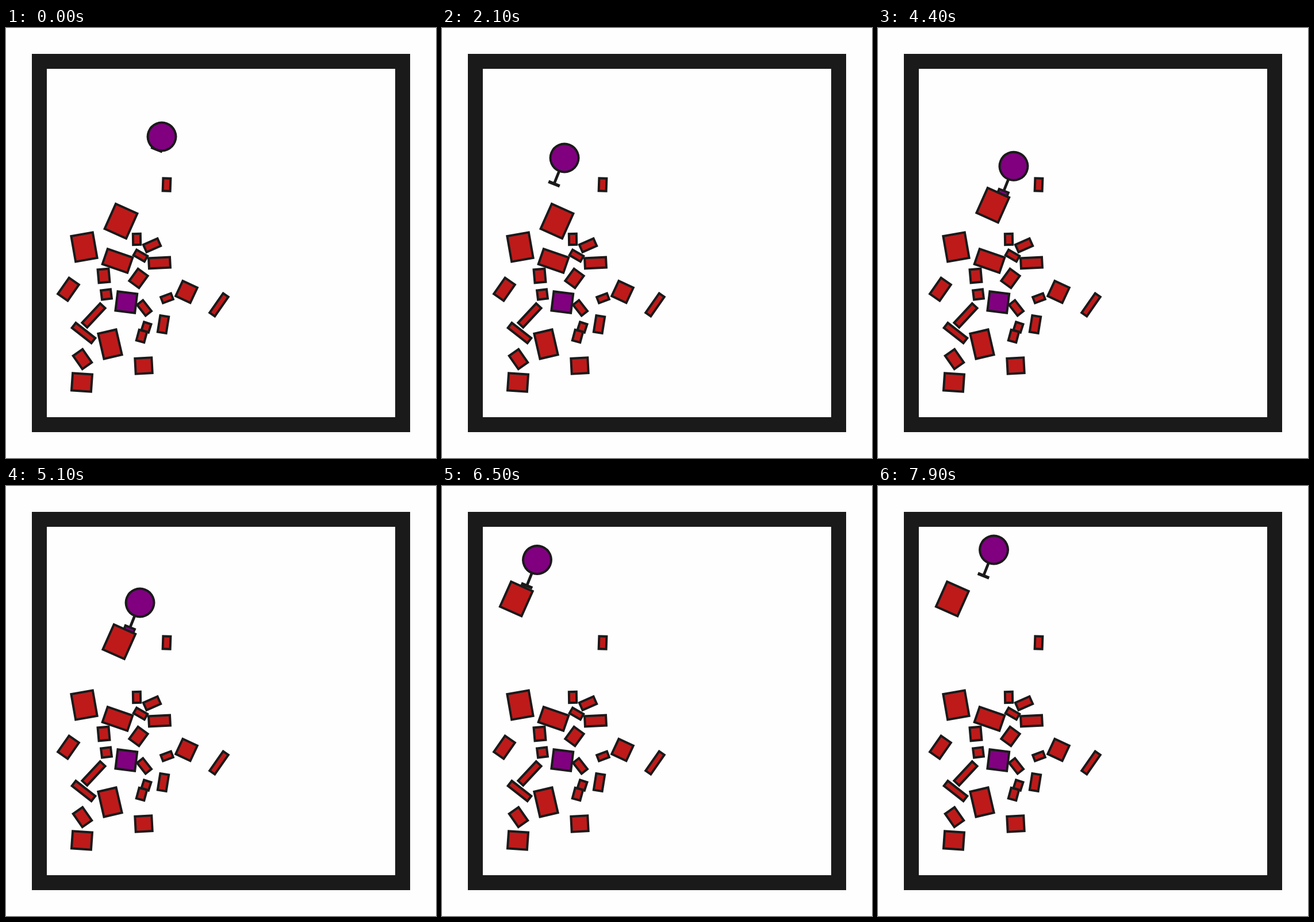
Write an HTML page with a canvas that moves like this. It is 748 by 748 pixels and loops after 8000 ms.

```html
<!DOCTYPE html>
<html lang="en">
<head>
<meta charset="utf-8">
<title>Robot moving blocks</title>
<style>
html, body { margin: 0; width: 100%; height: 100%; overflow: hidden; background: #fefefe; }
canvas { display: block; }
</style>
</head>
<body>
<canvas id="stage" width="748" height="748"></canvas>
<script>
const ctx = document.getElementById('stage').getContext('2d');
const INK = '#1a1a1a', RED = '#be1a1a', PURPLE = '#800080', PAPER = '#fefefe';
const STEP = 100, LOOP = 8000, GRASP = 3900, RELEASE = 6500;
const RAD = Math.PI / 180, HEADING = 111.8 * RAD;
const HELD = { x: -36.2, y: 67.9 };   // carried block relative to the robot

// centre x, centre y, width, height, degrees
const blocks = [
  [279.5, 272.5, 13, 22, 2],
  [136, 381, 38, 45, -10],
  [194, 405, 46, 28, 19],
  [227.5, 367.5, 13, 19, -1],
  [254, 378, 27, 14, -24],
  [234, 396, 22, 11, 30],
  [267, 408.5, 37, 18, -3],
  [170, 431, 19, 23, -5],
  [230.5, 435.5, 21, 26, 36],
  [108.5, 454.5, 21, 34, 35],
  [174.5, 463.5, 17, 16, -7],
  [240.5, 487, 24, 13, 52],
  [280, 470, 19, 11, -21],
  [314, 459, 28, 29, 25],
  [370.5, 481.5, 11, 41, 35],
  [152.5, 500, 12, 46, 43],
  [135, 530.5, 43, 11, 38],
  [273.5, 515.5, 15, 29, 9],
  [244, 520.5, 13, 15, 18],
  [236, 536, 14, 19, 15],
  [181, 550, 32, 45, -13],
  [133, 576, 28, 20, 55],
  [239.5, 587.5, 29, 27, -3],
  [132, 616.5, 34, 30, 4]
];

// route of the robot: time, x, y
const route = [
  [200, 271, 189], [800, 225, 204], [1100, 205, 213], [1500, 193, 228],
  [2100, 213, 226], [2900, 234, 246], [3300, 236, 267], [3800, 236, 267],
  [4700, 236, 227], [5100, 233, 203], [5600, 218, 171], [6500, 165.5, 128.5],
  [7000, 144, 106], [7900, 201.5, 111]
];

function robotAt(t) {
  const i = Math.max(1, route.findIndex(p => p[0] >= t));
  const [t0, x0, y0] = route[i - 1], [t1, x1, y1] = route[i];
  const k = Math.max(0, (t - t0) / (t1 - t0));
  return { x: x0 + (x1 - x0) * k, y: y0 + (y1 - y0) * k };
}

function placed(x, y, angle, paint) {
  ctx.save();
  ctx.translate(x, y);
  ctx.rotate(angle);
  paint();
  ctx.restore();
}

function box(x, y, w, h, fill) {
  ctx.fillStyle = fill;
  ctx.fillRect(x, y, w, h);
  ctx.strokeRect(x, y, w, h);
}

function block(x, y, w, h, deg, fill = RED) {
  placed(x, y, deg * RAD, () => box(-w / 2, -h / 2, w, h, fill));
}

function robot({ x, y }, reach, holding) {
  placed(x, y, HEADING, () => {
    ctx.fillStyle = INK;
    ctx.fillRect(0, -2.4, reach, 4.8);
    if (holding) box(46.2, -8.7, 7, 17.4, PURPLE);
    else ctx.fillRect(reach - 2.75, -10.5, 5.5, 21);
    ctx.beginPath();
    ctx.arc(0, 0, 24.4, 0, 2 * Math.PI);
    ctx.fillStyle = PURPLE;
    ctx.fill();
    ctx.stroke();
  });
}

function draw(t) {
  ctx.fillStyle = PAPER;
  ctx.fillRect(0, 0, 748, 748);
  ctx.strokeStyle = INK;
  ctx.lineWidth = 26;
  ctx.strokeRect(58, 58, 632, 632);
  ctx.lineWidth = 4;

  robot(robotAt(t), t < STEP ? 23.8 : 48.5, t >= GRASP && t < RELEASE);
  for (const b of blocks) block(...b);
  block(209.3, 477, 34, 33.5, 7, PURPLE);

  let cargo = { x: 200, y: 336 };
  if (t >= GRASP) {
    const carrier = robotAt(Math.min(t, RELEASE));
    cargo = { x: carrier.x + HELD.x, y: carrier.y + HELD.y };
  }
  block(cargo.x, cargo.y, 41, 47.5, 24);
}

function tick() {
  const t = performance.now() % LOOP;
  draw(Math.floor(t / STEP) * STEP);
  requestAnimationFrame(tick);
}
tick();
</script>
</body>
</html>
```
